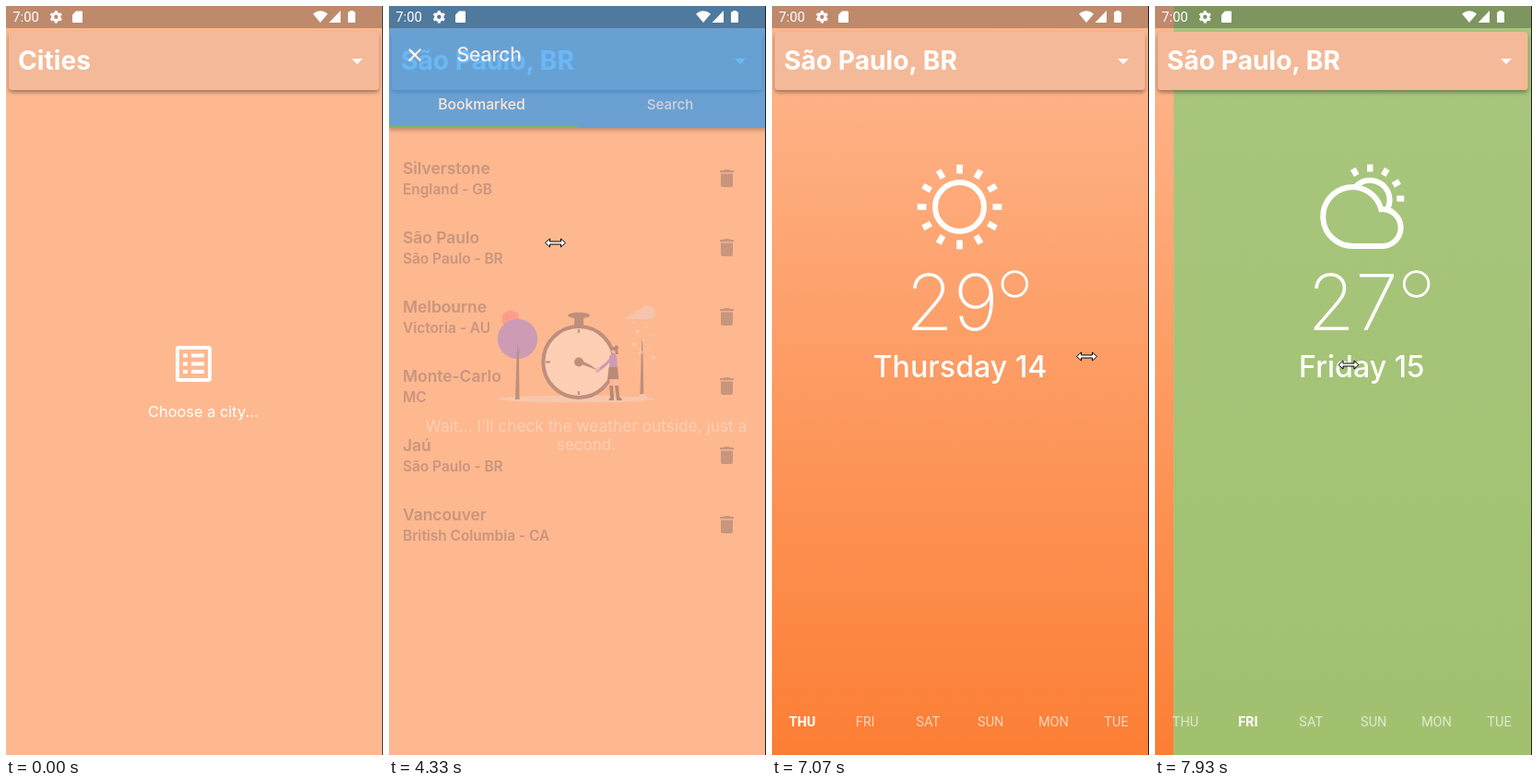
Animation, 409 px wide and 811 px high, one loop 8 s. Source, as an HTML page:

```html
<!DOCTYPE html>
<html lang="en">
<head>
<meta charset="utf-8">
<title>Weather app</title>
<style>
html, body { margin: 0; width: 100%; height: 100%; overflow: hidden; background: #feb890; }
svg { display: block; width: 100vw; height: 100vh; }
text { font-family: Inter, "Open Sans", sans-serif; fill: #fff; }
.mid { text-anchor: middle; }
.roboto { font-family: Roboto, sans-serif; }
.list text { fill: #ae8574; font-weight: 600; }
.line { fill: none; stroke: #fff; stroke-width: 6; }
</style>
</head>
<body>
<svg viewBox="0 0 409 811" xmlns="http://www.w3.org/2000/svg">
  <defs>
    <linearGradient id="warm" x1="0" y1="0" x2="0" y2="1">
      <stop offset="0" stop-color="#feb890"/><stop offset="1" stop-color="#fc7e34"/>
    </linearGradient>
    <linearGradient id="mild" x1="0" y1="0" x2="0" y2="1">
      <stop offset="0" stop-color="#a8c67e"/><stop offset="1" stop-color="#a1c16f"/>
    </linearGradient>
    <filter id="lift" x="-10%" y="-20%" width="120%" height="150%">
      <feDropShadow dx="0" dy="2.5" stdDeviation="2" flood-color="#000" flood-opacity=".36"/>
    </filter>
  </defs>

  <rect width="409" height="811" fill="#feb890"/>

  <g id="empty">
    <rect x="186" y="370" width="35" height="35" rx="1.5" fill="none" stroke="#fff" stroke-width="4"/>
    <path d="M192 378.5h5m4 0h14M192 387.5h5m4 0h14M192 396h5m4 0h14" stroke="#fff" stroke-width="4.2"/>
    <text x="154" y="444.5" font-size="16.4">Choose a city...</text>
  </g>

  <g id="loading">
    <ellipse cx="203" cy="425.5" rx="85" ry="3.8" fill="#e6e6e6"/>
    <circle cx="132" cy="339" r="9.5" fill="#ff6584"/>
    <circle cx="139.5" cy="360.5" r="21.7" fill="#6c63ff"/>
    <g fill="#3f3d56">
      <path d="M139 366l1.5 9 2-6-1.5 9 .5 48h-4.500z"/>
      <rect x="201" y="335" width="10" height="12"/>
      <ellipse cx="206" cy="335" rx="12" ry="3.3"/>
    </g>
    <circle cx="205.8" cy="385.5" r="38.5" fill="#fff" stroke="#3f3d56" stroke-width="4"/>
    <g fill="#3f3d56">
      <path d="M204.8 350h2v4h-2zM204.8 417h2v4h-2zM170 384.500h5v2h-5z"/>
      <circle cx="206" cy="385.5" r="5"/>
      <path d="M207 383l11 5.500 9 6-10-3.500-11-4z"/>
    </g>
    <path d="M241 382l-7 7-9 7" fill="none" stroke="#6c63ff" stroke-width="3"/>
    <path d="M228 392l-3 3" stroke="#ffb8b8" stroke-width="2.5"/>
    <path d="M239 379q4-4 8 0l1 13h-9z" fill="#6c63ff"/>
    <circle cx="244.5" cy="373.5" r="3" fill="#ffb8b8"/>
    <path d="M240 372q2-3 5-3l1-2 3 2-1 4 1 4-3 0-1-4z" fill="#2f2e41"/>
    <path d="M238.500 391h9.500l1 13h-12z" fill="#2f2e41"/>
    <path d="M240.500 404l1 10m5-10v10" stroke="#ffb8b8" stroke-width="2.5"/>
    <path d="M239 411h4l1 13v3h-6l2-3zM245 411h4l1 12 3 3v1h-6z" fill="#2f2e41"/>
    <path d="M256 339q5-5 10-5 2-6 7-5 4-6 10-4 7 3 5 10-1 4-6 4z" fill="#e0e1e6"/>
    <g id="snow" fill="#e6e6e6"></g>
    <path d="M274.500 358l1 15 .8 51h-4l1.500-51z" fill="#3f3d56"/>
    <path d="M275 377l-3-7m3 5 3-5" stroke="#e6e6e6"/>
    <path d="M269 426q1-6 6-6 5 0 6 6z" fill="#e6e6e6"/>
    <text class="mid" x="214" y="460.5" font-size="17.3">Wait... I'll check the weather outside, just a</text>
    <text class="mid" x="214" y="481" font-size="17">second.</text>
  </g>

  <g id="weather">
    <g id="today">
      <rect width="408" height="811" fill="url(#warm)"/>
      <circle class="line" cx="203.5" cy="217.5" r="26.5"/>
    </g>
    <g id="next">
      <rect width="409" height="811" fill="url(#mild)"/>
      <path class="line" d="M194 260A32 32 0 1 1 225 220A20 20 0 0 1 227.500 260Z"/>
      <path class="line" d="M196.500 196.500A21.300 21.300 0 0 1 232.500 218.500"/>
    </g>
    <g id="days"></g>
  </g>

  <rect x="3" y="28" width="401.5" height="63" rx="4" fill="#f4b998" filter="url(#lift)"/>
  <text id="city" x="13" y="69" font-size="28.2" font-weight="700"></text>
  <path d="M375 57h12l-6 6z" fill="#fff"/>

  <g id="search">
    <rect width="409" height="811" fill="#feb890"/>
    <rect width="409" height="132" fill="#2196f3" filter="url(#lift)"/>
    <rect y="130" width="204" height="2" fill="#4caf50"/>
    <path d="M21.800 46.800l12.600 12.600m0-12.600l-12.600 12.600" stroke="#fff" stroke-width="2.2"/>
    <text x="73.5" y="60" font-size="21" font-weight="500">Search</text>
    <text class="mid" x="100.5" y="112" font-size="15.7" font-weight="500">Bookmarked</text>
    <text class="mid" x="305" y="112" font-size="15" font-weight="500" opacity=".7">Search</text>
    <g id="list" class="list"></g>
  </g>

  <rect width="409" height="24" fill="#000" opacity=".25"/>
  <g fill="#fff">
    <text class="roboto" x="7.3" y="17.3" font-size="14.8">7:00</text>
    <g id="gear"><circle cx="54.3" cy="11.8" r="3.7" fill="none" stroke="#fff" stroke-width="3"/></g>
    <path d="M76 5.500h6q1 0 1 1v10.500q0 1-1 1h-9q-1 0-1-1v-7.500z"/>
    <path d="M333 8.500q8-6.500 16 0l-8 9.500z"/>
    <path d="M350.500 18l12.500-13v13z"/>
    <path d="M373 6.300v-1.300h4v1.300h1q1 0 1 1v9.700q0 1-1 1h-6q-1 0-1-1v-9.700q0-1 1-1z"/>
  </g>
  <path id="cursor" d="M-11 0l5-4.500v3h12v-3l5 4.500-5 4.500v-3h-12v3z" fill="#fff" stroke="#000"/>
  <rect id="edge" x="408" width="1" height="811"/>
</svg>
<script>
const LOOP = 8000, FPS = 15, WIDTH = 408;
const el = id => document.getElementById(id);
const add = (id, markup) => el(id).insertAdjacentHTML("beforeend", markup);
const show = (id, on) => el(id).setAttribute("display", on ? "inline" : "none");
const move = (id, x, y = 0) => el(id).setAttribute("transform", `translate(${x} ${y})`);
const repeat = (n, make) => Array.from({ length: n }, (_, i) => make(i)).join("");

const rays = (id, cx, cy, from, len, w, n, step, turn = 0) => add(id, repeat(n, i =>
  `<rect x="${from}" y="${-w / 2}" width="${len}" height="${w}" fill="#fff"
    transform="translate(${cx} ${cy}) rotate(${turn + i * step})"/>`));
rays("today", 203.5, 217.5, 36, 9.8, 6.6, 12, 30);
rays("next", 213, 208.5, 29, 8, 6.4, 5, -30);
rays("gear", 54.3, 11.8, 4, 2.7, 3, 6, 60, 30);

const forecast = (id, temp, day) => add(id,
  `<text x="145" y="350.5" font-size="84" font-weight="200">${temp}</text>
   <circle cx="263.3" cy="301" r="13.3" fill="none" stroke="#fff" stroke-width="2.8"/>
   <text class="mid" x="204" y="402" font-size="32.2" font-weight="500">${day}</text>`);
forecast("today", 29, "Thursday 14");
forecast("next", 27, "Friday 15");

const names = ["THU", "FRI", "SAT", "SUN", "MON", "TUE"];
add("days", repeat(names.length, i =>
  `<text class="roboto mid" x="${33 + i * 68.1}" y="780" font-size="14.5">${names[i]}</text>`));
const days = [...el("days").children];

const places = [
  ["Silverstone", "England - GB"], ["São Paulo", "São Paulo - BR"],
  ["Melbourne", "Victoria - AU"], ["Monte-Carlo", "MC"],
  ["Jaú", "São Paulo - BR"], ["Vancouver", "British Columbia - CA"]
];
add("list", repeat(places.length, i =>
  `<g transform="translate(0 ${i * 75})">
     <text x="15" y="182" font-size="17.4">${places[i][0]}</text>
     <text x="15" y="203.5" font-size="15.4">${places[i][1]}</text>
     <path d="M359 178h4l1-1h5l1 1h4v2.200h-15zM360 181.500h13v12.500q0 2-2 2h-9q-2 0-2-2z" fill="#ae8574"/>
   </g>`));

add("snow", repeat(10, i =>
  `<circle cx="${264 + (i * 0.618 % 1) * 24}" cy="${343 + i * 4.7}" r="${1 + i % 3 * 0.6}"/>`));

// Each glide runs between two ticks (1/15 s) and ends at x, y.
const entry = [332, 212];
const glides = [
  [9, 14, 149, 72.5], [17, 21, 168.5, 65.5], [47, 57, 180.5, 256.5], [70, 71, 187.5, 256.5],
  [74, 80, 319.5, 341.5], [80, 84, 341.5, 379.5], [106, 112, 235.5, 390.5], [112, 115, 210, 388.5]
];
function pointer(k) {
  let [x, y] = entry;
  for (const [from, to, toX, toY] of glides) {
    const f = Math.min(1, Math.max(0, (k - from) / (to - from)));
    x += (toX - x) * f;
    y += (toY - y) * f;
  }
  return [x, y];
}

// The page follows the finger past a small slop, then settles once released.
function pageEdge(k, x) {
  const dragged = k < 106 ? 0 : Math.max(0, 341.5 - x - 15);
  const settle = k > 112 ? 1 / (1 + Math.exp(0.85 * (k - 115.95))) : 1;
  return (WIDTH - dragged) * settle;
}

function draw(ms) {
  const k = Math.floor((ms % LOOP + 4) * FPS / 1000) % (LOOP * FPS / 1000);
  const picked = k >= 65, loaded = k >= 82;

  show("empty", !picked);
  show("loading", picked && !loaded);
  show("weather", loaded);
  el("city").textContent = picked ? "São Paulo, BR" : "Cities";

  show("search", k >= 37 && k < 67);
  el("search").setAttribute("opacity", Math.min(1, (67 - k) / 3));

  const [x, y] = pointer(k), edge = pageEdge(k, x);
  show("cursor", k >= 9);
  move("cursor", x, y);
  move("today", edge - WIDTH);
  move("next", edge);

  const active = edge < WIDTH / 2 ? 1 : 0;
  days.forEach((d, i) => {
    d.setAttribute("font-weight", i === active ? 700 : 400);
    d.setAttribute("opacity", i === active ? 1 : 0.65);
  });
  el("edge").setAttribute("fill", k < 26 ? "#3b444c" : "#1c1f22");
}

const start = performance.now();
function tick(now) {
  draw(Math.max(0, now - start));
  requestAnimationFrame(tick);
}
draw(0);
requestAnimationFrame(tick);
</script>
</body>
</html>
```
